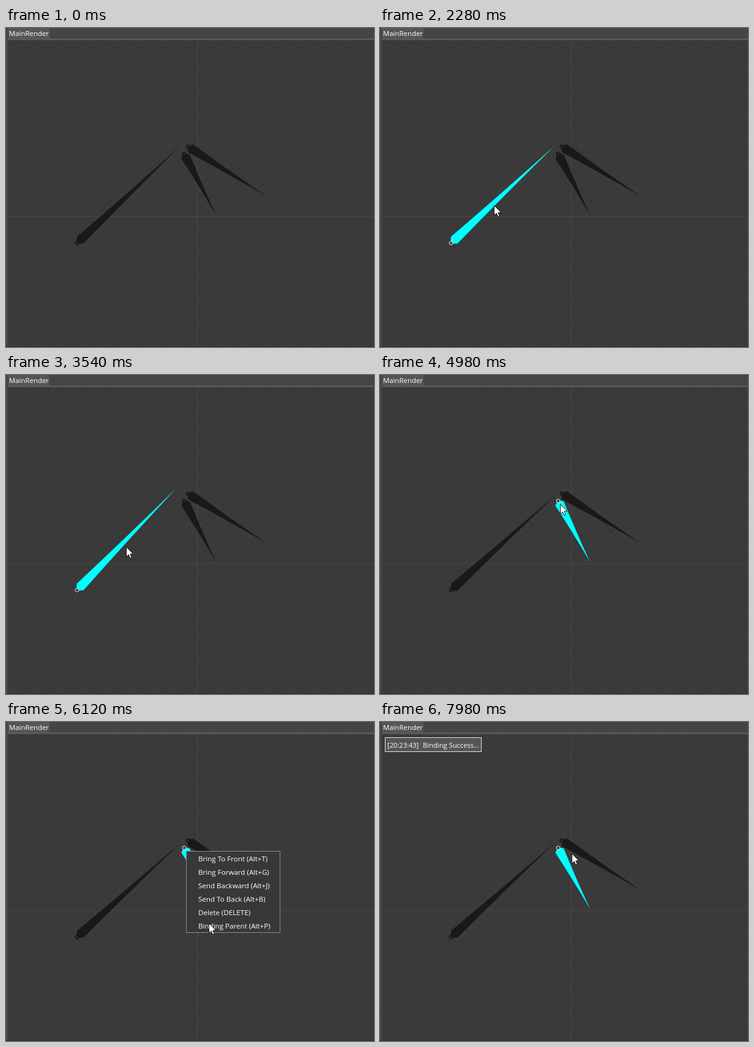
These frames come from a looping animation (601x522 px, 8 s). An HTML page with a canvas:

```html
<!DOCTYPE html>
<html lang="en">
<head>
<meta charset="utf-8">
<title>Bone editor</title>
<style>
  html, body { margin: 0; width: 100%; height: 100%; overflow: hidden; background: #3a3a3a; }
  canvas { display: block; }
</style>
</head>
<body>
<canvas id="stage" width="601" height="522"></canvas>
<script>
const ctx = document.getElementById('stage').getContext('2d');
const LOOP = 8000, TICK = 60, DEGREE = Math.PI / 180;
const FONT = '"Open Sans", "Noto Sans", sans-serif';
const PIVOT = { x: 116, y: 352 };
const MENU = ['Bring To Front (Alt+T)', 'Bring Forward (Alt+G)', 'Send Backward (Alt+J)',
  'Send To Back (Alt+B)', 'Delete (DELETE)', 'Binding Parent (Alt+P)'];

// Eased progress from 0 to 1 between two times
function glide(t, from, to) {
  const p = Math.min(1, Math.max(0, (t - from) / (to - from)));
  return p * p * (3 - 2 * p);
}

// Angle of the pointer around the arm's pivot, in degrees: down, up, then settling
function swing(t) {
  return 41.5 - 24 * glide(t, 2460, 2880) + 29 * glide(t, 2880, 3300)
    - 5 * glide(t, 3480, 3540) - glide(t, 3540, 3720);
}

function draggedPointer(t) {
  const angle = swing(t) * DEGREE;
  const radius = 93.5 + 13 * glide(t, 2460, 3540);
  return { x: PIVOT.x + radius * Math.cos(angle), y: PIVOT.y - radius * Math.sin(angle) };
}

function pointerAt(t) {
  const dragging = t >= 2460;
  const pos = dragging ? draggedPointer(t) : { x: 543, y: 406 };
  const moveTo = (x, y, from, to) => {
    const p = glide(t, from, to);
    pos.x += (x - pos.x) * p;
    pos.y += (y - pos.y) * p;
  };
  if (!dragging) moveTo(186, 290, 1000, 1900);
  moveTo(294, 211, 4080, 4740);
  moveTo(331, 329, 5220, 5700);
  moveTo(163, 306, 6120, 6900);
  moveTo(313, 215, 7620, 7980);
  return pos;
}

function rect(x, y, w, h, color) {
  ctx.fillStyle = color;
  ctx.fillRect(x, y, w, h);
}

function panel(x, y, w, h, fill, border) {
  rect(x, y, w, h, border);
  rect(x + 1, y + 1, w - 2, h - 2, fill);
}

function text(str, x, y, size) {
  ctx.font = `500 ${size}px ${FONT}`;
  ctx.fillStyle = '#fff';
  ctx.fillText(str, x, y);
}

function drawBackground() {
  rect(0, 0, 601, 522, '#3b3b3b');
  ctx.fillStyle = '#393939';
  for (let y = 20; y < 522; y += 10)
    for (let x = 3 + (y / 10 % 2) * 10; x < 601; x += 20) ctx.fillRect(x, y, 10, 10);
  rect(312, 20, 1, 502, '#484848');
  rect(3, 308, 598, 1, '#484848');
  rect(0, 0, 601, 17, '#454545');
  rect(0, 0, 3, 522, '#464646');
  rect(3, 0, 68, 17, '#555');
  rect(3, 17, 598, 3, '#585858');
  rect(0, 521, 601, 1, '#332f31');
  text('MainRender', 5, 13, 11.4);
}

function drawBone({ x, y }, length, angle, selected) {
  const shoulder = 2.5 + length * 0.02, half = 7.7;
  ctx.save();
  ctx.translate(x, y);
  ctx.rotate(angle);
  // The sides curve slightly inwards towards the tip
  ctx.beginPath();
  ctx.moveTo(-1.5, 0);
  ctx.lineTo(shoulder, -half);
  ctx.quadraticCurveTo(length / 2, -half * 0.36, length, 0);
  ctx.quadraticCurveTo(length / 2, half * 0.36, shoulder, half);
  ctx.fillStyle = selected ? '#00ffff' : '#191919';
  ctx.fill();
  ctx.beginPath();
  ctx.arc(0, 0, 2.8, 0, Math.PI * 2);
  ctx.fillStyle = selected ? '#3a3a3a' : '#2a2a2a';
  ctx.fill();
  ctx.strokeStyle = selected ? '#ddd' : '#0e0e0e';
  ctx.lineWidth = 1;
  ctx.stroke();
  ctx.restore();
}

function drawMenu() {
  panel(294, 211, 154, 134, '#383838', '#8c8c8c');
  MENU.forEach((label, i) => text(label, 314, 228 + i * 22, 11.6));
}

function drawToast() {
  panel(8, 25, 158, 24, '#555', '#e4e4e4');
  text('[20:23:43]', 12, 42, 11.1);
  text('Binding Success...', 70, 42, 11.2);
}

function drawPointer({ x, y }) {
  const arrow = new Path2D('M0 0V16L3.7 12.6L6.2 18.2L8.7 17.1L6.3 11.6L11.3 11.4Z');
  ctx.save();
  ctx.translate(Math.round(x) + 0.5, Math.round(y) + 0.5);
  ctx.fillStyle = '#fff';
  ctx.fill(arrow);
  ctx.strokeStyle = '#151515';
  ctx.lineWidth = 1;
  ctx.stroke(arrow);
  ctx.restore();
}

function draw(time) {
  const t = Math.floor(time % LOOP / TICK) * TICK;
  const during = (from, to) => t >= from && t < to;
  const armSelected = during(2280, 4980) || during(6840, 7320);
  const childSelected = during(4980, 7260) || t >= 7320;
  // The arm trails the pointer by half a tick
  const armAngle = swing(t - TICK / 2) + 1.8;

  drawBackground();
  drawBone(PIVOT, 232, -armAngle * DEGREE, armSelected);
  drawBone({ x: 297, y: 194 }, 152, 32.3 * DEGREE, false);
  drawBone({ x: 291, y: 206 }, 113, 62.5 * DEGREE, childSelected);
  if (during(5220, 6180)) drawMenu();
  if (t >= 7260) drawToast();
  if (t >= 1020) drawPointer(pointerAt(t));
}

const start = performance.now();
function frame() {
  draw(performance.now() - start);
  requestAnimationFrame(frame);
}
frame();
</script>
</body>
</html>
```
